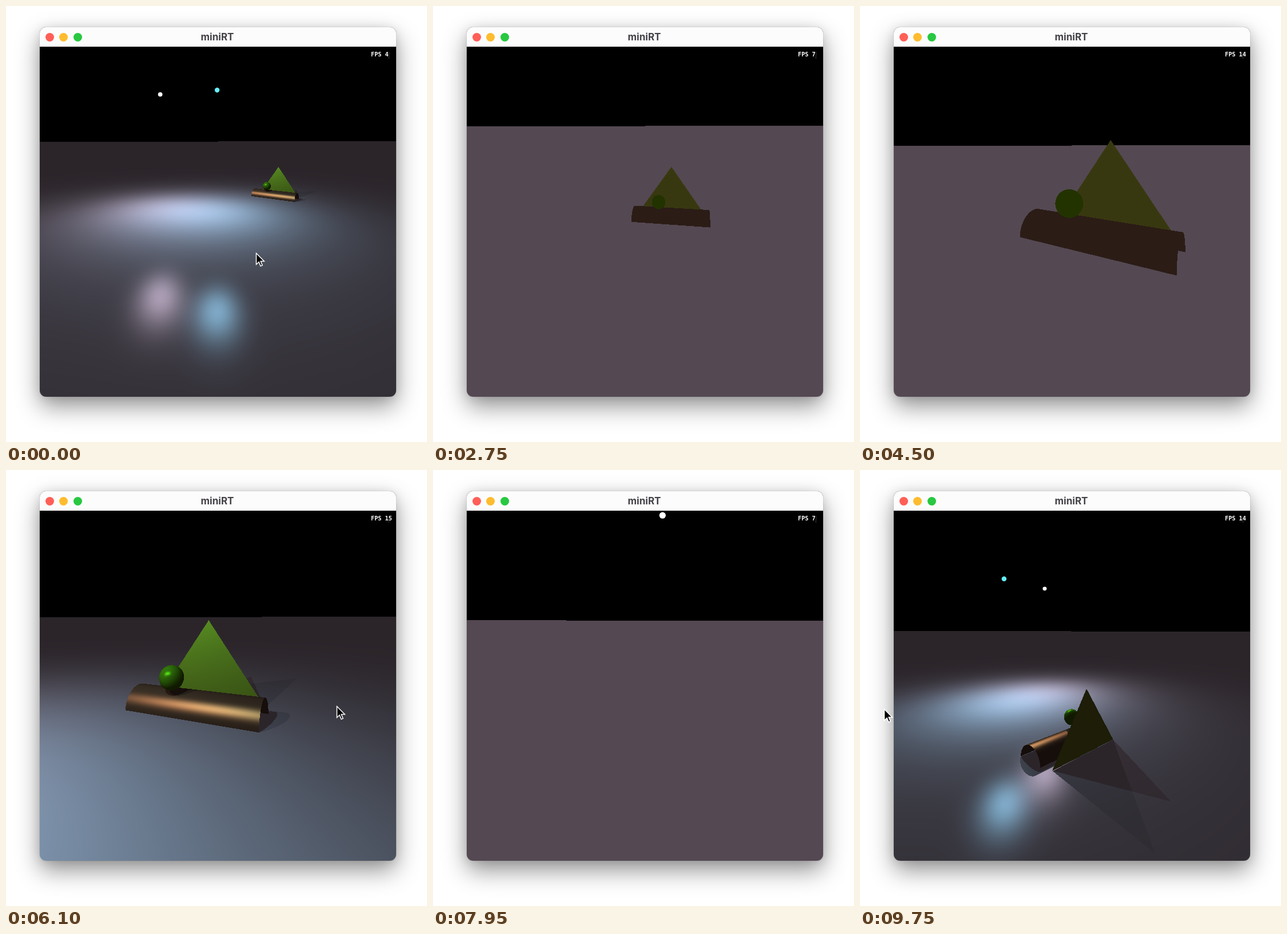
An HTML page with a canvas for the animation above (9800 ms loop, 736 px wide and 761 px high).

```html
<!DOCTYPE html>
<html lang="en">
<head>
<meta charset="utf-8">
<title>miniRT</title>
<style>
  html, body { margin: 0; width: 100%; height: 100%; overflow: hidden; background: #fff; }
  #stage { position: relative; width: 736px; height: 761px; overflow: hidden; }
  #window {
    position: absolute; left: 59px; top: 37px; width: 623px; height: 645px;
    border-radius: 11px; background: #fcfcfc;
    box-shadow: 0 0 1px rgba(0,0,0,.65), 0 17px 42px rgba(0,0,0,.42), 0 2px 18px rgba(0,0,0,.1);
  }
  #title {
    position: absolute; left: 0; width: 621px; top: 0; height: 34px;
    font: 700 17px/34px Inter, sans-serif; text-align: center; color: #444147;
  }
  .light { position: absolute; top: 9.5px; width: 15px; height: 15px; border-radius: 50%; }
  canvas { position: absolute; left: 59px; top: 71px; border-radius: 0 0 11px 11px; }
  #fps {
    position: absolute; left: 638px; top: 79px; white-space: pre; color: #fff;
    font: 700 10.2px/12px "DejaVu Sans Mono", monospace;
  }
  #caret { position: absolute; left: 669px; top: 80px; width: 1px; height: 12px; background: rgba(255,255,255,.22); }
  #cursor { position: absolute; left: 0; top: 0; overflow: visible; }
</style>
</head>
<body>
<div id="stage">
  <div id="window">
    <i class="light" style="left:9.5px;background:#ff5f57"></i>
    <i class="light" style="left:34px;background:#febc2e"></i>
    <i class="light" style="left:58.8px;background:#28c840"></i>
    <div id="title">miniRT</div>
  </div>
  <canvas id="view" width="623" height="611"></canvas>
  <div id="fps"></div>
  <div id="caret"></div>
  <svg id="cursor" width="16" height="26">
    <path d="M0 0V19.5L4.6 15.2L7.6 22.4L10.7 21.1L7.7 14H13.8Z" fill="#000" stroke="#fff" stroke-width="1.5"/>
  </svg>
</div>
<script>
const LOOP = 9800, STEP = 50;
const LEFT = 59, TOP = 71, WIDTH = 623, HEIGHT = 611, CENTER = 370, FOCAL = 445;
const AMBIENT = .51, EPS = .003;

const ctx = document.getElementById('view').getContext('2d');
const fpsLabel = document.getElementById('fps');
const cursor = document.getElementById('cursor');

// The world: floor at y = 0, tube along the x axis and half sunk, upright triangle behind it.
// flat: colour without lamps, lit: diffuse colour, shine: highlight colour.
const floor = { flat: [84,72,82], lit: [84,72,82], shine: [88,76,86], gloss: 110, lift: .79 };
const wedge = { x: -.02, z: .394, half: .68, height: .962,
  flat: [56,56,16], lit: [100,125,28], shine: [0,0,0], gloss: 1, lift: 1 };
const ball = { x: -.22, y: .37, z: -.116, r: .1285,
  flat: [34,51,0], lit: [40,75,10], shine: [35,70,6], gloss: 25, lift: 1 };
const tube = { half: .7245, r: .226,
  flat: [43,28,22], lit: [50,32,24], shine: [100,56,34], gloss: 10, lift: 1 };
const lamps = [
  { x: -2.04, y: 3.1, z: -3.04, tint: [1.2,1.22,1.22], css: '#fff' },
  { x: -.43, y: 3.1, z: -2.64, tint: [.73,1.42,1.49], css: '#65f0fc' }
];

// Camera pose: x, z, height, yaw in degrees, horizon line on the stage.
const far = [3.2, -7.84, 1.82, -34.8, 236.5];
const high = [2.51, -7.1, 2.64, -34.8, 236.5];
const front = [1.2, -2.41, 1, -21.5, 256.6];
const moves = [
  [850, 1100, mix(far, high, .5)],
  [1500, 1800, high],
  [1900, 2750, [.425, -4.91, 1.81, -10.8, 209.5]],
  [2750, 3450, [.51, -3.65, 1.6, -10.8, 208]],
  [3500, 4150, [.67, -1.56, .9, -31, 203]],
  [4350, 4500, [1.01, -2.12, .904, -31, 243.5]],
  [4500, 4600, [1.2, -2.41, 1, -31.5, 246]],
  [5050, 5200, front],
  [6550, 7950, [2.19, -.84, 1.14, -121.5, 262.6]],
  [7950, 8900, [2.854, 2.906, 1.82, -134.5, 281.5]]
];

const litSpans = [[0, 850], [5700, 6550], [9150, LOOP]];
const pointers = [[0, 850, 437.5, 431.5], [5350, 6550, 578.5, 412.5], [8700, LOOP, 42.5, 417.5]];
const counters = [[0, 4], [1500, 7], [4400, 14], [4600, 15], [6700, 7], [8700, 14]];

function mix(a, b, p) {
  return a.map((v, i) => v + (b[i] - v) * p);
}

function cameraAt(t) {
  let pose = far;
  for (const [from, to, next] of moves) {
    if (t <= from) break;
    pose = mix(pose, next, Math.min(1, (t - from) / (to - from)));
  }
  const [x, z, y, degrees, horizon] = pose;
  const yaw = degrees * Math.PI / 180;
  return { x, y, z, horizon, sin: Math.sin(yaw), cos: Math.cos(yaw) };
}

let hit;

// Distance along the ray to the nearest surface, which is left in `hit`.
function nearest(ox, oy, oz, dx, dy, dz, limit) {
  let best = limit;
  hit = null;

  let t = -oy / dy;
  if (dy < 0 && t < best) { best = t; hit = floor; }

  t = (wedge.z - oz) / dz;
  if (t > EPS && t < best) {
    const y = oy + t * dy, x = ox + t * dx - wedge.x;
    if (y >= 0 && Math.abs(x) < wedge.half * (1 - y / wedge.height)) { best = t; hit = wedge; }
  }

  const bx = ox - ball.x, by = oy - ball.y, bz = oz - ball.z;
  let a = dx * dx + dy * dy + dz * dz;
  let b = bx * dx + by * dy + bz * dz;
  let disc = b * b - a * (bx * bx + by * by + bz * bz - ball.r * ball.r);
  if (disc > 0) {
    t = (-b - Math.sqrt(disc)) / a;
    if (t > EPS && t < best) { best = t; hit = ball; }
  }

  a = dy * dy + dz * dz;
  b = oy * dy + oz * dz;
  disc = b * b - a * (oy * oy + oz * oz - tube.r * tube.r);
  if (disc > 0) {
    const root = Math.sqrt(disc);
    for (let side = -1; side <= 1; side += 2) {
      t = (-b + side * root) / a;
      if (t > EPS && t < best && Math.abs(ox + t * dx) < tube.half) { best = t; hit = tube; }
    }
  }
  return best;
}

function normalAt(thing, x, y, z) {
  if (thing === floor) return [0, 1, 0];
  if (thing === wedge) return [0, 0, 1];
  if (thing === tube) return [0, y / tube.r, z / tube.r];
  return [(x - ball.x) / ball.r, (y - ball.y) / ball.r, (z - ball.z) / ball.r];
}

// Ambient, diffuse and highlight of one surface point, with hard shadows.
function shade(thing, x, y, z, dx, dy, dz) {
  const color = thing.flat.map(v => v * AMBIENT);
  let [nx, ny, nz] = normalAt(thing, x, y, z);
  if (nx * dx + ny * dy + nz * dz > 0) { nx = -nx; ny = -ny; nz = -nz; }
  const len = Math.hypot(dx, dy, dz);
  const k = 2 * (dx * nx + dy * ny + dz * nz);
  const rx = (dx - k * nx) / len, ry = (dy - k * ny) / len, rz = (dz - k * nz) / len;

  for (const lamp of lamps) {
    const lx = lamp.x - x, ly = lamp.y - y, lz = lamp.z - z;
    const dist = Math.sqrt(lx * lx + ly * ly + lz * lz);
    const facing = (nx * lx + ny * ly + nz * lz) / dist;
    if (facing <= 0) continue;
    if (nearest(x + nx * EPS, y + ny * EPS, z + nz * EPS, lx, ly, lz, 1) < 1) continue;
    const diffuse = facing * (lamp.y / dist) ** 3.4;
    const sy = ly * thing.lift;
    const mirror = (rx * lx + ry * sy + rz * lz) / Math.sqrt(lx * lx + sy * sy + lz * lz);
    const spot = mirror > 0 ? mirror ** thing.gloss : 0;
    for (let c = 0; c < 3; c++) {
      color[c] += lamp.tint[c] * (thing.lit[c] * diffuse + thing.shine[c] * spot);
    }
  }
  return color;
}

function render(cam, lit) {
  const image = ctx.createImageData(WIDTH, HEIGHT), data = image.data;
  const tilt = -.0014 * cam.cos;
  let p = 0;
  for (let j = 0; j < HEIGHT; j++) {
    for (let i = 0; i < WIDTH; i++, p += 4) {
      const sx = LEFT + i + .5 - CENTER;
      const u = sx / FOCAL;
      const dx = cam.sin + cam.cos * u, dz = cam.cos - cam.sin * u;
      const dy = (cam.horizon + tilt * sx - TOP - j - .5) / FOCAL;
      const t = nearest(cam.x, cam.y, cam.z, dx, dy, dz, 1e6);
      data[p + 3] = 255;
      if (!hit) continue;
      const color = lit
        ? shade(hit, cam.x + t * dx, cam.y + t * dy, cam.z + t * dz, dx, dy, dz)
        : hit.flat;
      data[p] = color[0];
      data[p + 1] = color[1];
      data[p + 2] = color[2];
    }
  }
  return image;
}

function drawLamp(cam, lamp) {
  const x = lamp.x - cam.x, z = lamp.z - cam.z;
  const depth = x * cam.sin + z * cam.cos;
  if (depth < .1) return;
  const scale = FOCAL / depth;
  ctx.beginPath();
  ctx.arc(CENTER - LEFT + (x * cam.cos - z * cam.sin) * scale,
    cam.horizon - TOP - (lamp.y - cam.y) * scale, .06 * scale, 0, 7);
  ctx.fillStyle = lamp.css;
  ctx.fill();
}

const within = t => ([from, to]) => t >= from && t < to;
const stills = litSpans.map(([from]) => render(cameraAt(from), true));
let shown = '';

function draw(t) {
  const cam = cameraAt(t), still = litSpans.findIndex(within(t));
  const key = still + JSON.stringify(cam);
  if (key !== shown) {
    shown = key;
    ctx.putImageData(still < 0 ? render(cam, false) : stills[still], 0, 0);
    lamps.forEach(lamp => drawLamp(cam, lamp));
  }

  fpsLabel.textContent = 'FPS ' + counters.filter(c => c[0] <= t).pop()[1];
  const tip = pointers.find(within(t));
  cursor.style.display = tip ? '' : 'none';
  if (tip) cursor.style.transform = `translate(${tip[2]}px, ${tip[3]}px)`;
}

const start = performance.now();
function tick() {
  const t = (performance.now() - start) % LOOP;
  draw(Math.floor(t / STEP) * STEP);
  requestAnimationFrame(tick);
}
tick();
</script>
</body>
</html>
```
